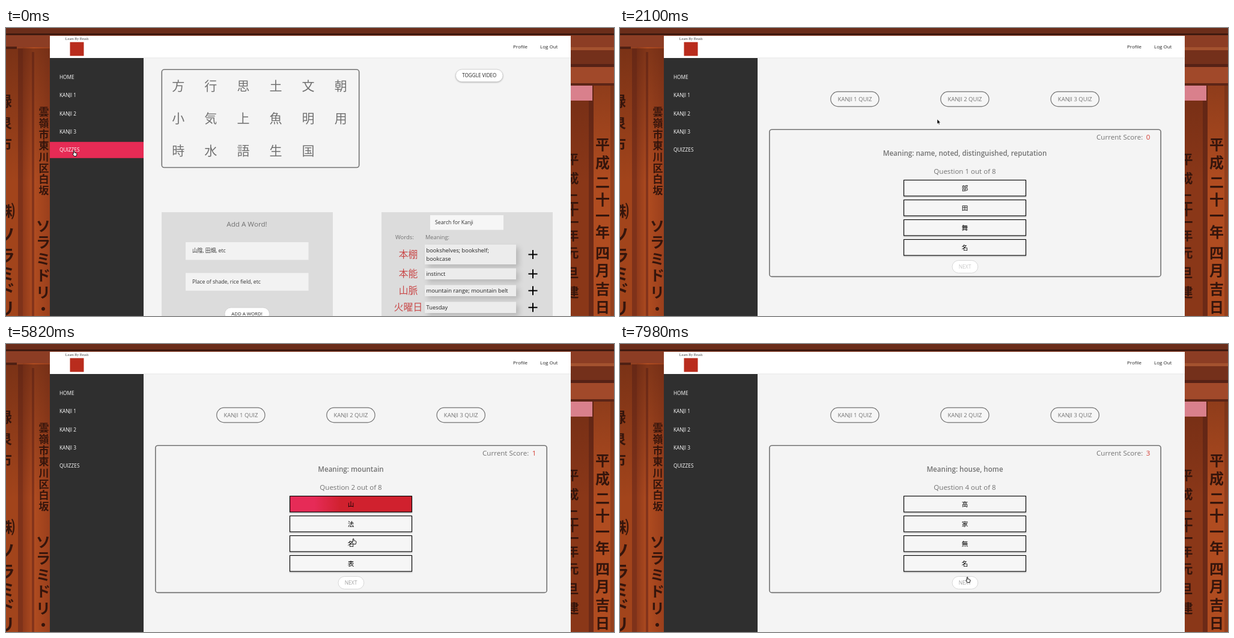
An HTML page that plays this animation: 1012x480 px, repeating every 8000 ms.

```html
<!DOCTYPE html>
<html lang="en">
<head>
<meta charset="utf-8">
<title>Kanji quiz</title>
<style>
  html, body { margin: 0; width: 100%; height: 100%; overflow: hidden; background: #8d3416; }
  svg { display: block; width: 1012px; height: 480px; }
  text { font-family: "Open Sans", "Noto Sans CJK JP", "Noto Sans CJK", sans-serif; white-space: pre; }
  .ink text { font-family: "Noto Sans CJK JP", "Noto Sans CJK", sans-serif; font-weight: 700; fill: #35150c; }
  .soft { filter: drop-shadow(0 1px 1.2px rgba(0, 0, 0, .25)); }
  .cast { filter: drop-shadow(5px 5px 4px rgba(0, 0, 0, .16)); }
</style>
</head>
<body>
<svg viewBox="0 0 1012 480">
  <defs>
    <linearGradient id="pick">
      <stop offset=".2" stop-color="#e62b57"/><stop offset=".42" stop-color="#d0212e"/>
    </linearGradient>
    <linearGradient id="post">
      <stop offset="0" stop-color="#8f3a1b"/><stop offset=".4" stop-color="#b04c20"/><stop offset="1" stop-color="#9a3f1c"/>
    </linearGradient>
    <linearGradient id="shade" x2="0" y2="1">
      <stop offset="0" stop-color="#4a1c10" stop-opacity=".45"/><stop offset=".5" stop-color="#4a1c10" stop-opacity="0"/>
    </linearGradient>
  </defs>
  <g id="still"></g>
  <g id="scene"></g>
  <g id="cursor" stroke-linejoin="round"></g>
</svg>
<script>
const LOOP = 8000, STEP = 60, GRAY = '#727272', PINK = '#e62b55';
const $ = id => document.getElementById(id);

const rect = (x, y, w, h, fill, extra = '') =>
  `<rect x="${x}" y="${y}" width="${w}" height="${h}" fill="${fill}" ${extra}/>`;
// y is the middle of the capitals
const text = (x, y, s, size, fill = GRAY, extra = '') =>
  `<text x="${x}" y="${y + size * .36}" font-size="${size}" fill="${fill}" ${extra}>${s}</text>`;
const mid = (x, y, s, size, fill, extra = '') => text(x, y, s, size, fill, 'text-anchor="middle" ' + extra);
const frame = (x, y, w, h) => rect(x, y, w, h, 'none', `rx="4" stroke="${GRAY}" stroke-width="1.6"`);
const pill = (x, y, w, h, fill, stroke, extra = '') =>
  rect(x, y, w, h, fill, `rx="${h / 2}" stroke="${stroke}" ${extra}`);
const column = (x, size, s, ys) =>
  [...s].map((c, i) => mid(x, typeof ys === 'function' ? ys(i) : ys[i], c, size)).join('');

function backdrop() {
  return rect(0, 0, 1012, 480, '#93401f')
    + rect(0, 34, 20, 446, '#a2441b') + rect(20, 34, 8, 446, '#7f321a')
    + rect(28, 30, 45, 450, 'url(#post)') + rect(43, 40, 4, 440, '#84341b')
    + rect(940, 96, 36, 384, '#8a3718') + rect(970, 96, 8, 384, '#6c2a17')
    + rect(978, 92, 34, 388, '#b04c20') + rect(1006, 92, 6, 388, '#94401d')
    + rect(0, 34, 1012, 446, 'url(#shade)')
    + rect(0, 0, 1012, 9, '#6b2d1a') + rect(0, 9, 1012, 3, '#3f1a10')
    + rect(0, 12, 1012, 20, '#8c3d24') + rect(0, 31, 18, 4, '#4f2013')
    + rect(940, 32, 72, 5, '#a4522f') + rect(940, 37, 72, 23, '#74301b') + rect(940, 60, 72, 5, '#562216')
    + rect(940, 65, 72, 27, '#a1492a') + rect(940, 92, 72, 4, '#5c2516')
    + rect(940, 96, 36, 25, '#d9808c')
    + '<g class="ink">'
    + column(-2, 24, '緑泉市', [122, 158, 194])
    + column(1, 28, '㈱ソラミドリ', [306, 345, 380, 410, 438, 468])
    + column(63, 17, '雲嶺市東川区白坂', i => 140 + i * 18.7)
    + column(62, 24, 'ソラミドリ・', i => 330 + i * 27.6)
    + column(943, 21, '平成二十一年元旦建', [218, 250, 284, 303, 323, 345, 374, 407, 440])
    + column(993, 24, '平成二十一年四月吉日', [194, 224, 257, 286, 313, 340, 375, 404, 435, 465])
    + '</g>';
}

function shell() {
  const menu = ['HOME', 'KANJI 1', 'KANJI 2', 'KANJI 3'];
  return backdrop()
    + rect(73, 13, 867, 467, '#f4f4f4') + rect(73, 13, 867, 37, '#fff')
    + rect(229, 49.5, 711, .8, '#e2e2e2') + rect(73, 50, 156, 430, '#2f2f2f')
    + mid(118, 18.3, 'Learn By Brush', 6, '#444', 'style="font-family:\'Liberation Serif\',serif"')
    + rect(106.5, 23.5, 23, 23, '#b92c1d')
    + text(844, 31, 'Profile', 8, '#222') + text(889, 31, 'Log Out', 8, '#222')
    + menu.map((s, i) => text(89, 82.2 + i * 30.2, s, 8.3, '#fff', 'font-weight="500"')).join('');
}

function home() {
  const words = [['本棚', 'bookshelves; bookshelf;', 361, 33], ['本能', 'instinct', 400.5, 18.5],
    ['山脈', 'mountain range; mountain belt', 428.5, 18.5], ['火曜日', 'Tuesday', 456.5, 18.5]];
  const field = (y, s) => rect(299, y, 204.5, 29.5, '#f2f2f2') + text(310, y + 14.2, s, 8.7, '#333');
  return frame(259.3, 69.3, 328.4, 163.2)
    + [...'方行思土文朝小気上魚明用時水語生国'].map((c, i) =>
        mid(286.7 + i % 6 * 54.1, 96.5 + Math.floor(i / 6) * 54.2, c, 21)).join('')
    + pill(748.5, 69, 78.5, 20.5, '#fff', '#ccc', 'stroke-width=".8" class="soft"')
    + mid(787.8, 79.2, 'TOGGLE VIDEO', 8.15, '#222')
    + rect(259, 307, 285, 173, '#dcdcdc') + mid(401, 326.5, 'Add A Word!', 11.66)
    + field(357, '山陰, 田畑, etc') + field(408.3, 'Place of shade, rice field, etc')
    + pill(364, 466, 74.5, 21, '#fff', '#ccc', 'stroke-width=".8"') + mid(401, 476.3, 'ADD A WORD!', 7.9, '#222')
    + rect(625, 307, 285, 173, '#dcdcdc') + rect(706, 312, 122, 24.5, '#f6f6f6')
    + text(714, 323.8, 'Search for Kanji', 8.74, '#333')
    + text(648, 349, 'Words:', 9.5) + text(698, 349, 'Meaning:', 9.27)
    + words.map(([k, s, y, h], i) => {
        const c = y + h / 2;
        return mid(669.5, c, k, 15.8, '#c94a4a') + rect(697, y, 152, h, '#ececec', 'class="cast"')
          + text(699.5, i ? c : 370.5, s, 9.35, '#222') + (i ? '' : text(699.5, 384.5, 'bookcase', 9.35, '#222'))
          + `<path d="M869.5 ${c}h15M877 ${c - 7.5}v15" stroke="#000" stroke-width="2"/>`;
      }).join('');
}

const quizTabs = () => [350.7, 533.8, 717.1].map((x, i) =>
  pill(x, 106.2, 80.3, 24.6, '#f6f6f6', GRAY, 'stroke-width="1.2"')
  + mid(x + 40.2, 118.4, `KANJI ${i + 1} QUIZ`, 9.5)).join('');

function intro() {
  const lines = [
    [222.3, 'Come check your progress with these simple Kanji quizzes.'],
    [256.3, 'It is an 8 question quiz that will display the meaning of a Kanji and you have to choose the matching'],
    [273.3, 'Kanji.'],
    [307.3, 'At the end of the quiz it will display how many questions you got correct, and your answers. So you'],
    [324.3, 'can study and retake the test.'],
    [358.3, 'There is a quiz for each section. Kanji 1, Kanji 2 and Kanji 3. You can retake the quizzes as many times'],
    [375.3, 'as you want.']];
  return quizTabs() + frame(248.8, 169.2, 651.4, 231.2)
    + text(302.5, 195, 'Kanji Quizzes!', 11.7, '#b5121b', 'font-weight="700"')
    + lines.map(([y, s]) => text(302.5, y, s, 11.44)).join('');
}

// shown from, answered at, chosen option, meaning, options
const questions = [
  [1800, 3780, 3, 'name, noted, distinguished, reputation', '部田舞名'],
  [4380, 5820, 0, 'mountain', '山法名表'],
  [6240, 7500, 2, 'month, moon', '表来月連'],
  [7920, 9000, 1, 'house, home', '高家無名']];

const optionAt = (x, y) => {
  const i = Math.floor((y - 253) / 33);
  return x > 472 && x < 676 && i >= 0 && i < 4 && y - 253 - i * 33 < 27.5 ? i : -1;
};

function quiz(n, t, x, y) {
  const [start, answered, choice, meaning, options] = questions[n];
  const lit = t >= answered ? choice : optionAt(x, y);
  const ready = t >= answered || (n && t < start + 2 * STEP);
  return quizTabs() + frame(248.8, 169.2, 651.4, 245.2)
    + text(793, 181.5, 'Current Score:', 11.6) + text(875.8, 181.5, n, 11.6, '#d43a30')
    + mid(574, 209.3, 'Meaning: ' + meaning, 11.6, GRAY, 'font-weight="600"')
    + mid(574, 239.3, `Question ${n + 1} out of 8`, 11.56)
    + [...options].map((c, i) =>
        rect(472.5, 253.5 + i * 33, 203, 26.5, i === lit ? 'url(#pick)' : '#f6f6f6',
          'stroke="#000" stroke-width="1.1" class="soft"')
        + mid(574, 266.9 + i * 33, c, 10.6, '#000')).join('')
    + pill(553, 387.4, 42.8, 21, '#fff', '#d4d4d4', 'stroke-width=".9"')
    + mid(574, 398, 'NEXT', 8.5, ready ? '#a0a0a0' : '#c8c8c8');
}

// time, x, y of the pointer tip
const path = [[0, 113, 204], [240, 113, 204], [600, 401, 177], [960, 408, 160], [1560, 398, 121], [1800, 398, 121],
  [2100, 528, 152], [2580, 588, 262], [3060, 580, 345], [3480, 578, 369], [3720, 578, 369], [4020, 578, 388],
  [4440, 578, 388], [4800, 582, 335], [5340, 584, 284], [5640, 578, 275], [5760, 578, 275], [5820, 578, 324],
  [6060, 578, 388], [6240, 578, 388], [6600, 585, 331], [6780, 585, 331], [6960, 586, 334], [7440, 586, 334],
  [7740, 578, 388], [LOOP, 578, 388]];

function pointer(t) {
  const i = path.findIndex(p => p[0] > t), [t0, x0, y0] = path[i - 1], [t1, x1, y1] = path[i];
  const k = (t - t0) / (t1 - t0), e = k * k * (3 - 2 * k);
  return [x0 + (x1 - x0) * e, y0 + (y1 - y0) * e];
}

const arrow = '<path d="M0 0V7.9L1.8 6.2 3 8.9 4.2 8.4 3.1 5.8H5.4Z" fill="#000" stroke="#fff" stroke-width=".5"/>';
const hand = '<path d="M-.6.9Q.2-.1 1 .9V3.7L4 4.3Q5.1 4.8 4.9 6L4.1 9.6H.4L-2.3 5.8Q-1.9 4.7-.6 5.6Z" fill="#fff" stroke="#000" stroke-width=".9"/>';

function draw(t) {
  const [x, y] = pointer(t);
  const n = questions.filter(q => q[0] <= t).length - 1;
  const page = t < 120 ? home() : n < 0 ? intro() : quiz(n, t, x, y);
  const bar = 27 * Math.min(1, Math.max(0, (670 - t) / 320));
  $('scene').innerHTML = rect(73, 203.3 - bar / 2, 156, bar, PINK)
    + text(89, 203, 'QUIZZES', 8.3, '#fff', 'font-weight="500"') + page;

  const overTab = t >= 120 && x > 351 && x < 431 && y > 106 && y < 131;
  const overNext = x > 553 && x < 596 && y > 387;
  const clickable = x < 229 || overTab || n >= 0 && (overNext || optionAt(x, y) >= 0);
  $('cursor').setAttribute('transform', `translate(${x} ${y})`);
  $('cursor').innerHTML = clickable ? hand : arrow;
}

$('still').innerHTML = shell();
let last = -1;
const begin = performance.now();
function tick() {
  const t = Math.floor((performance.now() - begin) % LOOP / STEP) * STEP;
  if (t !== last) draw(last = t);
  requestAnimationFrame(tick);
}
tick();
</script>
</body>
</html>
```
